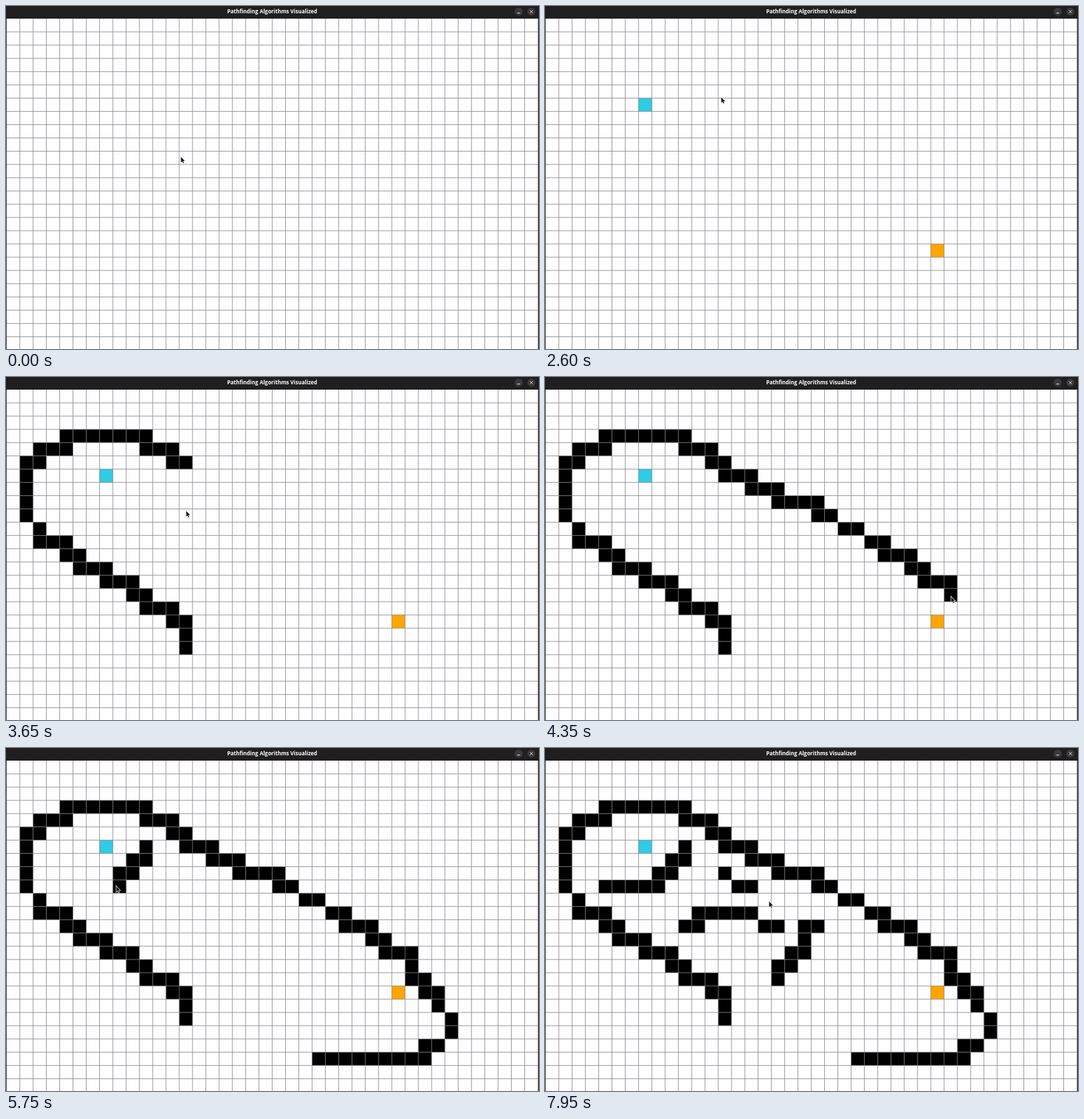
Recreate the animation shown at these times as an HTML page with a canvas. Size 800 by 516 pixels, loop 8000 ms.

```html
<!DOCTYPE html>
<html lang="en">
<head>
<meta charset="utf-8">
<title>Pathfinding Algorithms Visualized</title>
<style>
  html, body { margin: 0; width: 100%; height: 100%; overflow: hidden; background: #fefdff; }
  canvas { display: block; }
</style>
</head>
<body>
<canvas id="stage" width="800" height="516"></canvas>
<script>
const ctx = document.getElementById('stage').getContext('2d');
const LOOP = 8000, STEP = 50, PITCH = 19.94, SAMPLES = 199;
const toX = col => 0.8 + PITCH * col;
const toY = row => 19 + PITCH * row;

// Pointer actions in grid units; the pointer eases from the end of one to the start of the next.
const actions = [];
const act = (color, start, end, ...points) => actions.push({ color, start, end, points });
const hover = (start, end, point) => act(null, start, end, point);
const draw = (start, end, ...points) => act('#000', start, end, ...points);

hover(0, 150, [13.1, 10.4]);
act('#30cbe6', 650, 720, [7.5, 6.5]);
act('#ffa500', 1600, 1750, [29.5, 17.5]);
hover(2400, 2600, [13.2, 5.9]);
draw(2650, 3420, [13.5, 5.6], [10.5, 4], [9, 3.4], [5.5, 3.4], [2.5, 5], [1.5, 5.9],
  [1.5, 9.5], [2.5, 10.5], [2.6, 11], [12.5, 17], [13.5, 17.7], [13.5, 19.5]);
draw(3750, 4850, [13.5, 6.2], [20.2, 9], [22, 10], [24, 11], [28.6, 14], [30.5, 15],
  [30.5, 16.3], [33, 19], [33.5, 20.5], [32.5, 21.5], [31.2, 22], [23.5, 22.5]);
draw(5550, 5930, [10.5, 6.2], [10.4, 7.3], [8.5, 9], [8.2, 9.5], [4.5, 9.5]);
draw(6350, 6680, [10.5, 12.5], [11.5, 12], [12.5, 11.4], [15, 11.4], [16, 12], [17.5, 12.5]);
hover(6800, 6800, [18.7, 13.4]);
draw(7150, 7550, [20.5, 12.4], [19.5, 12.8], [19.3, 14.2], [17.4, 16.5]);
draw(7780, 7900, [13.4, 8.4], [14, 9], [15.5, 9.5]);
hover(7950, LOOP, [16.8, 10.6]);

// Sample each action at constant speed and note when each cell is first touched.
const trail = [], cells = new Map();

function touch(time, x, y, color) {
  trail.push({ time, x, y });
  const col = Math.floor(x), row = Math.floor(y), key = col + ',' + row;
  if (color && !cells.has(key)) cells.set(key, { time, col, row, color });
}

for (const { color, start, end, points } of actions) {
  const lengths = points.slice(1).map(([x, y], i) => Math.hypot(x - points[i][0], y - points[i][1]));
  const total = lengths.reduce((sum, n) => sum + n, 0);
  let travelled = 0;
  lengths.forEach((length, i) => {
    const [x0, y0] = points[i], [x1, y1] = points[i + 1];
    for (let n = 0; n < SAMPLES; n++) {
      const u = n / SAMPLES;
      const time = start + (end - start) * (travelled + length * u) / total;
      touch(time, x0 + (x1 - x0) * u, y0 + (y1 - y0) * u, color);
    }
    travelled += length;
  });
  const last = points[points.length - 1];
  if (!total) touch(start, ...last, color);
  touch(end, ...last, color);
}

function pointerAt(t) {
  const i = trail.findIndex(p => p.time > t);
  const a = trail[i - 1], b = trail[i];
  const u = (t - a.time) / (b.time - a.time), ease = u * u * (3 - 2 * u);
  return [toX(a.x + (b.x - a.x) * ease), toY(a.y + (b.y - a.y) * ease)];
}

function rect(color, x, y, w, h) {
  ctx.fillStyle = color;
  ctx.fillRect(x, y, w, h);
}

function line(...points) {
  ctx.beginPath();
  points.forEach(([x, y]) => ctx.lineTo(x, y));
}

function drawGrid(t) {
  rect('#fefdff', 0, 0, 800, 516);
  for (const { time, col, row, color } of cells.values()) {
    if (time <= t) rect(color, toX(col), toY(row), PITCH, PITCH);
  }
  const gray = 'rgba(128,128,128,0.8)';
  for (let c = 1; c <= 40; c++) rect(gray, toX(c) - 0.5, 19, 1, 497);
  for (let r = 1; r < 25; r++) rect(gray, 0, toY(r) - 0.5, 800, 1);
  rect('#3a383a', 0, 19, 1, 497);
  rect('#2a282a', 799, 19, 1, 497);
}

function drawTitleBar() {
  rect('#211e20', 0, 0, 800, 19);
  ctx.fillStyle = '#fff';
  ctx.font = 'bold 8px "Open Sans", "Noto Sans", sans-serif';
  ctx.textAlign = 'center';
  ctx.fillText('Pathfinding Algorithms Visualized', 399.5, 11.3);
  for (const x of [769.5, 788.5]) {
    ctx.fillStyle = '#3b393b';
    ctx.beginPath();
    ctx.arc(x, 8.5, 6, 0, 2 * Math.PI);
    ctx.fill();
  }
  ctx.strokeStyle = '#f0f0f0';
  ctx.lineWidth = 1;
  line([767.5, 10.5], [771.5, 10.5]);
  ctx.stroke();
  line([786.5, 6.5], [790.5, 10.5]);
  ctx.stroke();
  line([790.5, 6.5], [786.5, 10.5]);
  ctx.stroke();
}

function drawPointer(x, y) {
  ctx.save();
  ctx.translate(x, y);
  line([0.5, 0.5], [0.5, 9], [2.4, 7.3], [3.8, 10.2], [5.1, 9.6], [3.8, 6.8], [6.3, 6.5]);
  ctx.closePath();
  ctx.strokeStyle = '#fff';
  ctx.lineWidth = 1.3;
  ctx.stroke();
  ctx.fillStyle = '#1c1c1c';
  ctx.fill();
  ctx.restore();
}

function frame() {
  const t = Math.floor(performance.now() % LOOP / STEP) * STEP;
  drawGrid(t);
  drawTitleBar();
  drawPointer(...pointerAt(t));
  requestAnimationFrame(frame);
}
frame();
</script>
</body>
</html>
```
